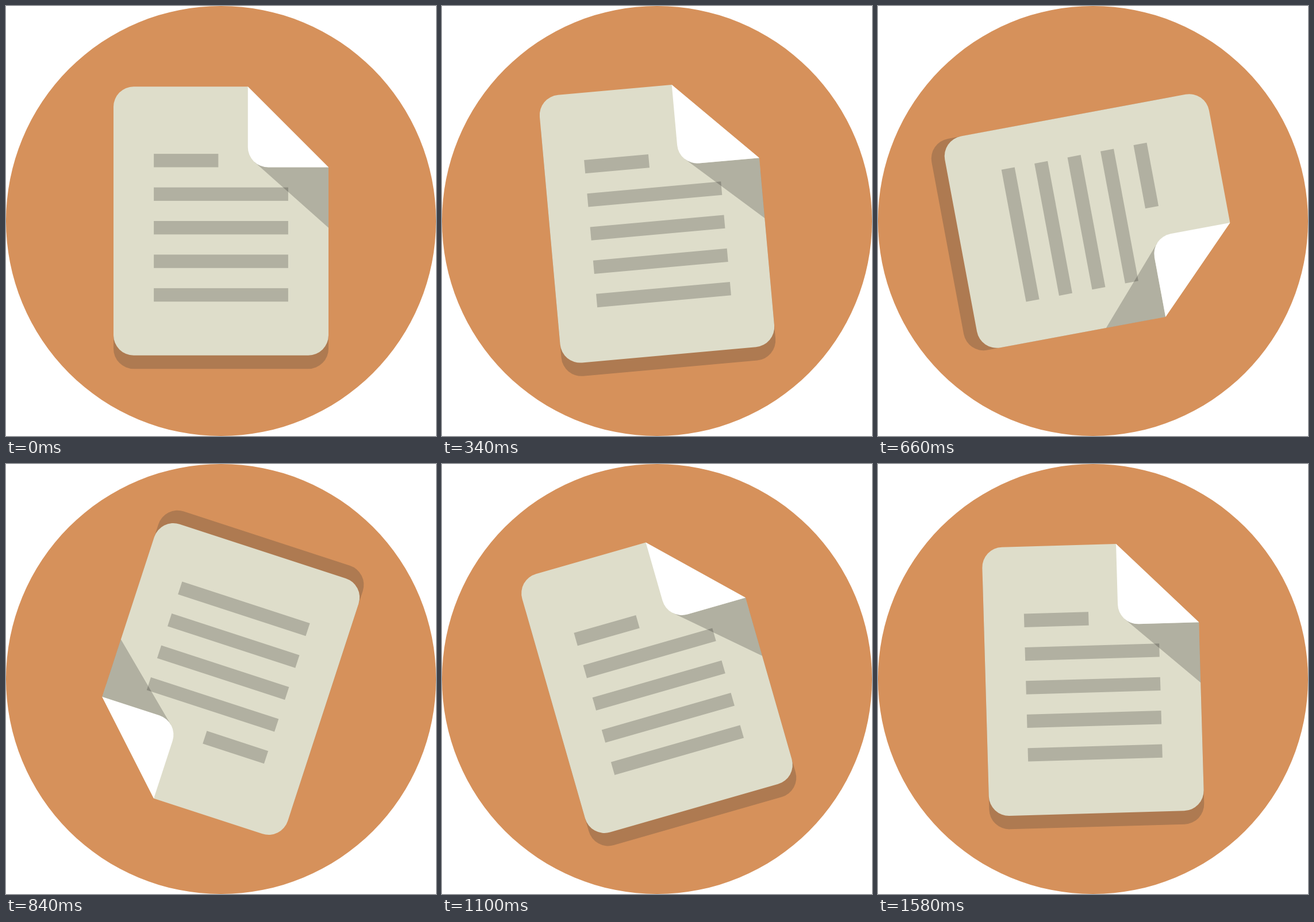
An HTML page with a canvas that plays this animation: 748 by 748 pixels, repeating every 1600 ms.

```html
<!DOCTYPE html>
<html lang="en">
<head>
<meta charset="utf-8">
<title>Spinning document</title>
<style>
  html, body { margin: 0; width: 100%; height: 100%; overflow: hidden; background: #fff; }
  canvas { display: block; }
</style>
</head>
<body>
<canvas id="stage" width="748" height="748"></canvas>
<script>
const ctx = document.getElementById("stage").getContext("2d");
const SIZE = 748;
const UNIT = SIZE / 64; // the icon sits on a 64-unit grid
const LOOP = 1600;
const STEP = 20;

const SHADE = "rgba(0, 0, 0, 0.205)";

// Wind-up, one full turn, then a damped settle: [ms, degrees, degrees per ms]
const SPIN = [
  [0, 0, 0.06],
  [40, 1.6, 0],
  [340, -5.13, -0.005],
  [660, 79.43, 0.62],
  [840, 198.07, 0.68],
  [960, 280.95, 0.65],
  [1280, 364.76, -0.005],
  [1580, 358.36, 0],
  [1600, 360, 0.06]
];

function angleAt(time) {
  const i = SPIN.findIndex((key, n) => n > 0 && time <= key[0]);
  const [t0, a0, v0] = SPIN[i - 1];
  const [t1, a1, v1] = SPIN[i];
  const span = t1 - t0;
  const p = (time - t0) / span;
  const q = 1 - p;
  return a0 * q * q * (1 + 2 * p) + a1 * p * p * (3 - 2 * p)
    + span * p * q * (v0 * q - v1 * p);
}

function polygon(color, points) {
  ctx.fillStyle = color;
  ctx.beginPath();
  points.forEach(([x, y]) => ctx.lineTo(x, y));
  ctx.fill();
}

// Sheet outline with its top right corner cut off
function sheet(color, dy) {
  ctx.fillStyle = color;
  ctx.beginPath();
  ctx.moveTo(36, 12 + dy);
  ctx.lineTo(48, 24 + dy);
  ctx.arcTo(48, 52 + dy, 16, 52 + dy, 3);
  ctx.arcTo(16, 52 + dy, 16, 12 + dy, 3);
  ctx.arcTo(16, 12 + dy, 36, 12 + dy, 3);
  ctx.closePath();
  ctx.fill();
}

function fold() {
  polygon(SHADE, [[36.88, 23.12], [48, 33], [48, 24], [39, 24]]);
  ctx.fillStyle = "#fff";
  ctx.beginPath();
  ctx.moveTo(36, 12);
  ctx.arcTo(36, 24, 48, 24, 3);
  ctx.lineTo(48, 24);
  ctx.fill();
}

function textLines() {
  ctx.fillStyle = SHADE;
  for (let row = 0; row < 5; row++) {
    ctx.fillRect(22, 22 + row * 5, row ? 20 : 9.6, 2);
  }
}

function draw(time) {
  ctx.setTransform(1, 0, 0, 1, 0, 0);
  ctx.fillStyle = "#fff";
  ctx.fillRect(0, 0, SIZE, SIZE);

  ctx.scale(UNIT, UNIT);
  ctx.fillStyle = "#d6915b";
  ctx.beginPath();
  ctx.arc(32, 32, 32, 0, Math.PI * 2);
  ctx.fill();

  ctx.translate(32, 32);
  ctx.rotate(angleAt(time) * Math.PI / 180);
  ctx.translate(-32, -32);
  sheet("#ae7a51", 2);
  sheet("#deddca", 0);
  textLines();
  fold();
}

const start = performance.now();

function frame() {
  const time = (performance.now() - start) % LOOP;
  draw(Math.floor(time / STEP) * STEP);
  requestAnimationFrame(frame);
}
frame();
</script>
</body>
</html>
```
